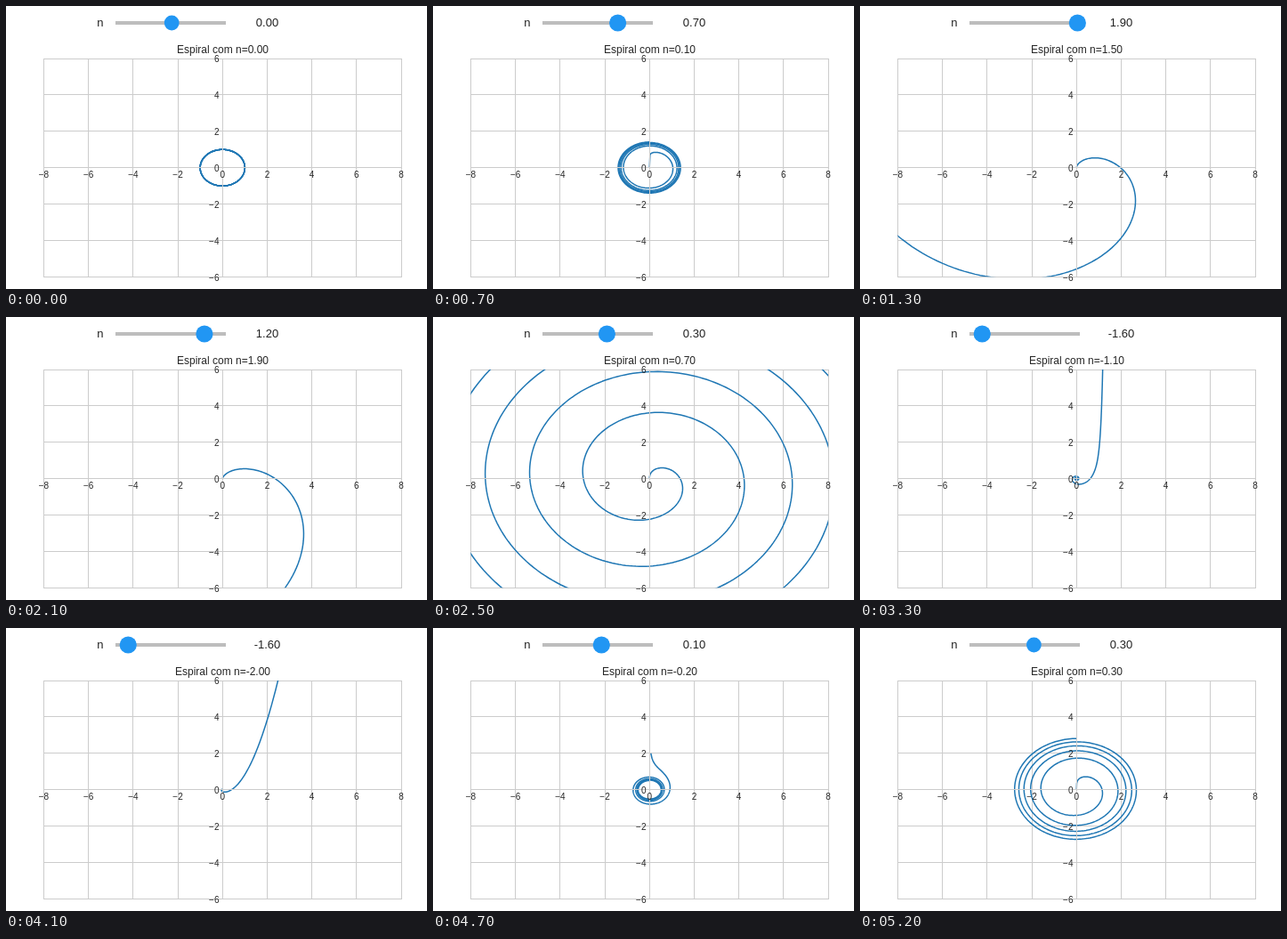
These frames come from a looping animation (473x318 px, 6600 ms). An HTML page with a canvas:

```html
<!DOCTYPE html>
<html lang="pt">
<head>
<meta charset="utf-8">
<title>Espiral</title>
<style>
html, body { margin: 0; width: 100%; height: 100%; overflow: hidden; background: #fff; }
canvas { display: block; width: 473px; height: 318px; }
</style>
</head>
<body>
<canvas id="stage" width="473" height="318"></canvas>
<script>
const ctx = document.getElementById('stage').getContext('2d');
const LOOP = 6600, STEP = 100;
const LAG = 180; // the plot trails behind the slider
const BOX = { left: 42.45, right: 444.05, top: 59.1, bottom: 304.3 };
const TURNS = 5, PER_TURN = 200;
const FONT = '"Liberation Sans", Arial, sans-serif';

// Drag of the slider: [ms, value]
const DRAG = [
  [500, 0], [700, 0.7], [1300, 1.9], [1400, 2], [1880, 2], [2100, 1.2],
  [2600, 0.05], [2800, -0.3], [3470, -2], [3990, -2], [4580, 0], [5000, 0.3]
];

const px = x => BOX.left + (x + 8) / 16 * (BOX.right - BOX.left);
const py = y => BOX.top + (6 - y) / 12 * (BOX.bottom - BOX.top);

// Interpolate the drag, rounded to the slider's step of 0.1
function sliderAt(t) {
  const i = DRAG.findIndex(k => k[0] > t);
  if (i === 0) return DRAG[0][1];
  if (i < 0) return DRAG[DRAG.length - 1][1];
  const [t0, v0] = DRAG[i - 1], [t1, v1] = DRAG[i];
  const v = v0 + (v1 - v0) * (t - t0) / (t1 - t0);
  return Math.round(v * 10) / 10 || 0;
}

function text(str, x, y, size, align = 'center', color = '#262626') {
  ctx.font = `${size}px ${FONT}`;
  ctx.textAlign = align;
  ctx.fillStyle = color;
  ctx.fillText(str, x, y);
}

function vline(x) {
  ctx.fillRect(Math.floor(px(x)), 59, 1, 246);
}

function hline(y) {
  ctx.fillRect(42, Math.floor(py(y)), 403, 1);
}

function drawSlider(value, radius) {
  text('n', 109.5, 23, 13, 'right', '#212121');
  ctx.fillStyle = '#bdbdbd';
  ctx.fillRect(123, 17, 124, 4);
  ctx.fillStyle = '#2196f3';
  ctx.beginPath();
  ctx.arc(186.2 + 30.6 * value, 19, radius, 0, 2 * Math.PI);
  ctx.fill();
  text(value.toFixed(2), 293.5, 23, 13, 'center', '#212121');
}

// r = angle^n, clockwise from the top; turns are stroked one by one
// so that overlapping edges grow darker
function drawSpiral(n) {
  ctx.save();
  ctx.beginPath();
  ctx.rect(BOX.left, BOX.top, BOX.right - BOX.left, BOX.bottom - BOX.top);
  ctx.clip();
  ctx.strokeStyle = '#1f77b4';
  ctx.lineWidth = 1.5;
  ctx.lineJoin = 'round';
  for (let turn = 0; turn < TURNS; turn++) {
    ctx.beginPath();
    for (let i = 0; i <= PER_TURN; i++) {
      const a = 2 * Math.PI * (turn + i / PER_TURN);
      if (a === 0 && n < 0) continue;
      const r = Math.pow(a, n);
      ctx.lineTo(px(r * Math.sin(a)), py(r * Math.cos(a)));
    }
    ctx.stroke();
  }
  ctx.restore();
}

function drawPlot(n) {
  const label = v => String(v).replace('-', '\u2212');
  ctx.fillStyle = '#ccc';
  for (let x = -8; x <= 8; x += 2) vline(x);
  for (let y = -6; y <= 6; y += 2) hline(y);
  drawSpiral(n);
  ctx.fillStyle = '#ccc';
  vline(0);
  hline(0);
  for (let x = -8; x <= 8; x += 2) text(label(x), px(x), 193, 10);
  for (let y = -6; y <= 6; y += 2) text(label(y), 239.5, Math.round(py(y) + 4.25), 10, 'right');
  text(`Espiral com n=${n.toFixed(2)}`, 243.5, 53, 12);
}

function frame(now) {
  const t = Math.floor(now % LOOP / STEP) * STEP;
  const held = t >= 400 && t < 5200;
  ctx.fillStyle = '#fff';
  ctx.fillRect(0, 0, 473, 318);
  drawSlider(sliderAt(t), held ? 9.6 : 8.4);
  drawPlot(sliderAt(t - LAG));
}

const start = performance.now();
function tick() {
  frame(performance.now() - start);
  requestAnimationFrame(tick);
}
tick();
</script>
</body>
</html>
```
